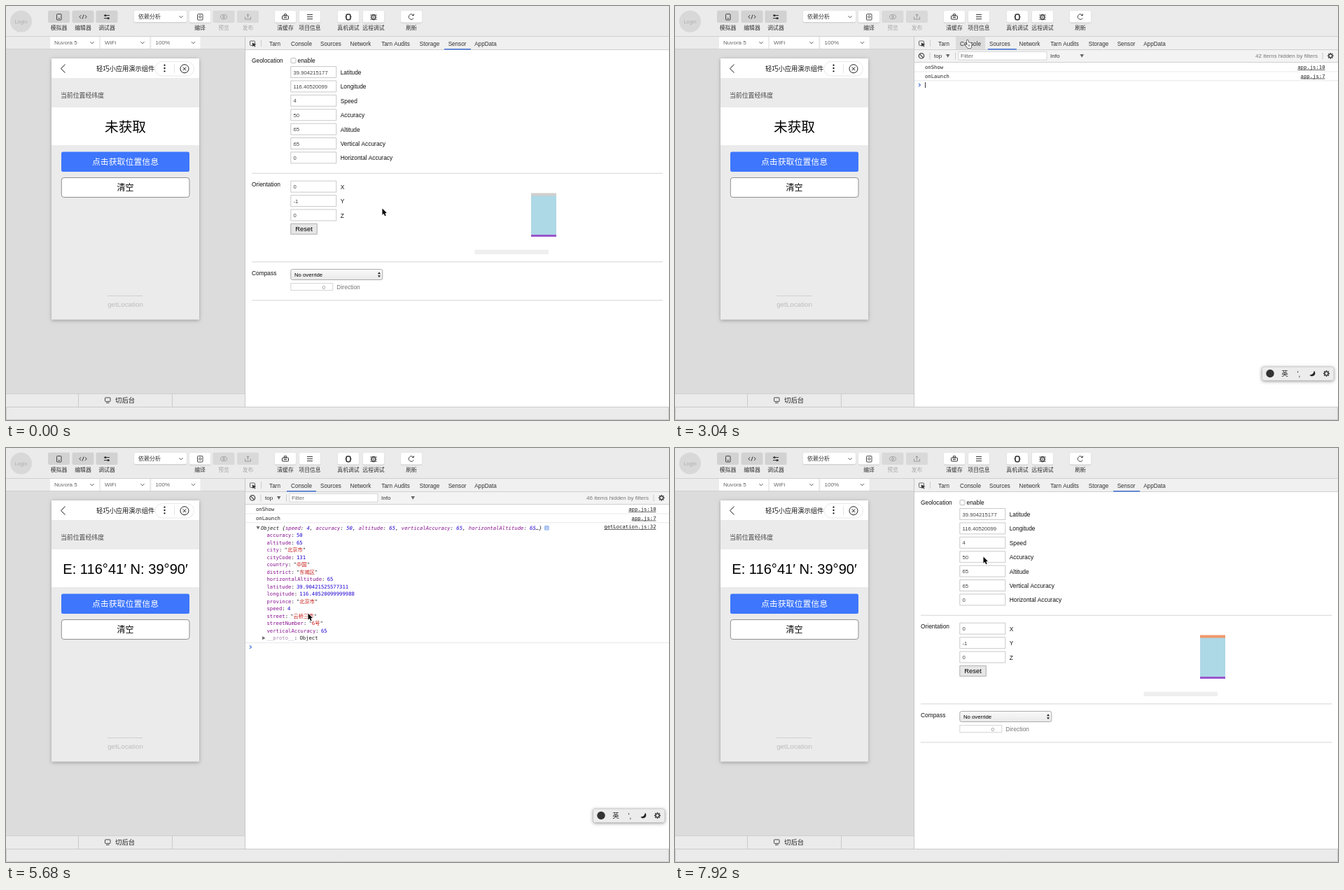
These frames come from a looping animation (947 px wide and 592 px high, 8 s). An HTML page with a canvas:

```html
<!DOCTYPE html>
<html lang="zh-CN">
<head>
<meta charset="utf-8">
<title>Sensor panel demo</title>
<style>
html, body { margin: 0; width: 100%; height: 100%; overflow: hidden; background: #fff; }
canvas { display: block; width: 947px; height: 592px; }
</style>
</head>
<body>
<canvas id="stage"></canvas>
<script>
const W = 947, H = 592, LOOP = 8000, STEP = 80;
const SANS = '"Liberation Sans", "Noto Sans CJK SC", "Noto Sans CJK", sans-serif';
const MONO = '"DejaVu Sans Mono", "Noto Sans CJK SC", "Noto Sans CJK", monospace';
const SHOW_CONSOLE = 2960, LOGGED = 3920, EXPANDED = 4960, SHOW_SENSOR = 7280;
const KEY = '#881391', NUM = '#1c00cf', STR = '#c41a16', INK = '#222';

const canvas = document.getElementById('stage');
const c = canvas.getContext('2d');
const dpr = window.devicePixelRatio || 1;
canvas.width = W * dpr;
canvas.height = H * dpr;

// ---- drawing helpers ----
function rect(x, y, w, h, color) {
  c.fillStyle = color;
  c.fillRect(x, y, w, h);
}
function box(x, y, w, h, r, fill, stroke, lw = 1) {
  c.beginPath();
  c.roundRect(x, y, w, h, r);
  if (fill) { c.fillStyle = fill; c.fill(); }
  if (stroke) { c.strokeStyle = stroke; c.lineWidth = lw; c.stroke(); }
}
function shadowBox(x, y, w, h, r, fill, blur, alpha) {
  c.save();
  c.shadowColor = `rgba(0,0,0,${alpha})`;
  c.shadowBlur = blur * dpr;
  c.shadowOffsetY = dpr;
  box(x, y, w, h, r, fill);
  c.restore();
}
function line(points, color, lw = 1) {
  c.beginPath();
  points.forEach(([x, y], i) => i ? c.lineTo(x, y) : c.moveTo(x, y));
  c.strokeStyle = color;
  c.lineWidth = lw;
  c.stroke();
}
function poly(points, fill) {
  c.beginPath();
  points.forEach(([x, y]) => c.lineTo(x, y));
  c.closePath();
  c.fillStyle = fill;
  c.fill();
}
function ring(x, y, r, color, lw = 1) {
  c.beginPath();
  c.arc(x, y, r, 0, 7);
  c.strokeStyle = color;
  c.lineWidth = lw;
  c.stroke();
}
function dot(x, y, r, color) {
  c.beginPath();
  c.arc(x, y, r, 0, 7);
  c.fillStyle = color;
  c.fill();
}
// y is the middle of the capitals
function text(s, x, y, size, color = '#111', align = 'left', font = SANS, style = '') {
  c.font = `${style} ${size}px ${font}`;
  c.textAlign = align;
  c.fillStyle = color;
  c.fillText(s, x, y + size * 0.37);
  return c.measureText(s).width;
}
const code = (s, x, y, color = INK, style = '', align = 'left') => text(s, x, y, 7.26, color, align, MONO, style);

function chevron(x, y) {
  line([[x - 2.5, y - 1.3], [x, y + 1.3], [x + 2.5, y - 1.3]], '#555', 1);
}
function gear(x, y, r, color) {
  for (let i = 0; i < 8; i++) {
    const a = i * Math.PI / 4, u = Math.cos(a), v = Math.sin(a);
    line([[x + u * r * 0.7, y + v * r * 0.7], [x + u * r * 1.1, y + v * r * 1.1]], color, 1.5);
  }
  ring(x, y, r * 0.62, color, 1.4);
}

// ---- toolbar ----
const icons = {
  phone(x, y, k) { box(x - 3, y - 4, 6.5, 8.5, 1, null, k, 0.9); line([[x - 1, y + 2.3], [x + 1.5, y + 2.3]], k, 0.9); },
  code(x, y, k) {
    line([[x - 3, y - 2.3], [x - 5, y], [x - 3, y + 2.3]], k);
    line([[x + 3, y - 2.3], [x + 5, y], [x + 3, y + 2.3]], k);
    line([[x + 1, y - 3], [x - 1, y + 3]], k);
  },
  sliders(x, y, k) {
    line([[x - 4, y - 2], [x + 4, y - 2]], k); line([[x - 4, y + 2], [x + 4, y + 2]], k);
    dot(x - 2, y - 2, 1.6, k); dot(x + 2, y + 2, 1.6, k);
  },
  build(x, y, k) { box(x - 3.5, y - 4, 7.5, 8.5, 1, null, k, 0.9); ring(x + 0.3, y, 1.6, k, 0.9); },
  eye(x, y, k) {
    c.beginPath(); c.ellipse(x, y, 4.6, 3, 0, 0, 7); c.strokeStyle = k; c.lineWidth = 0.9; c.stroke();
    ring(x, y, 1.3, k);
  },
  upload(x, y, k) {
    line([[x - 4, y], [x - 4, y + 3.5], [x + 4, y + 3.5], [x + 4, y]], k);
    line([[x, y + 1.5], [x, y - 4]], k); line([[x - 2, y - 2], [x, y - 4], [x + 2, y - 2]], k);
  },
  clear(x, y, k) { box(x - 4.5, y - 1.5, 9, 5, 0.8, null, k); box(x - 1.7, y - 4, 3.4, 2.5, 0.5, null, k); line([[x - 2, y + 1], [x + 2, y + 1]], k); },
  list(x, y, k) { for (const d of [-3, 0, 3]) line([[x - 4, y + d], [x + 4, y + d]], k); },
  device(x, y, k) { box(x - 3, y - 3.8, 6, 8, 2.5, null, k, 1.6); line([[x - 4.5, y], [x - 3, y]], k); line([[x + 3, y], [x + 4.5, y]], k); },
  bug(x, y, k) {
    c.beginPath(); c.ellipse(x, y + 0.5, 2.6, 3.6, 0, 0, 7); c.strokeStyle = k; c.lineWidth = 1.3; c.stroke();
    for (const d of [-2.5, 0.5, 3.5]) { line([[x - 4.8, y + d], [x - 2, y + d]], k, 0.9); line([[x + 2, y + d], [x + 4.8, y + d]], k, 0.9); }
    line([[x, y - 3], [x, y + 4]], k, 0.9);
  },
  refresh(x, y, k) {
    c.beginPath(); c.arc(x, y, 3.8, 0.5, 5.6); c.strokeStyle = k; c.lineWidth = 0.9; c.stroke();
    line([[x + 3.6, y - 4.2], [x + 3.3, y - 2], [x + 1, y - 2]], k, 0.9);
  }
};
const PRESSED = '#d2d2d2', DIM = '#d9d9d9';
const tools = [
  ['phone', '模拟器', 75.5, PRESSED], ['code', '编辑器', 110, PRESSED], ['sliders', '调试器', 144, PRESSED],
  ['build', '编译', 277, '#fff'], ['eye', '预览', 311, DIM], ['upload', '发布', 345.5, DIM],
  ['clear', '清缓存', 399, '#fff'], ['list', '项目信息', 434, '#fff'],
  ['device', '真机调试', 489, '#fff'], ['bug', '远程调试', 525, '#fff'], ['refresh', '刷新', 579, '#fff']
];
function toolbar() {
  rect(0, 0, W, 43, '#ebebeb');
  rect(0, 43, W, 1, '#cfcfcf');
  dot(21.5, 22, 15.5, '#d8d8d8');
  text('Login', 21.5, 22, 7.4, '#b0b0b0', 'center');
  for (const [icon, label, x, bg] of tools) {
    const off = bg === DIM;
    if (bg === '#fff') shadowBox(x - 15, 7, 30, 16.5, 2, bg, 1.5, 0.15);
    else box(x - 15.5, 6.5, 31, 17.5, 2, bg);
    icons[icon](x, 15.5, off ? '#999' : '#333');
    text(label, x, 31.5, 7.85, off ? '#aaa' : '#333', 'center');
  }
  shadowBox(183, 7, 75, 16, 2, '#fff', 1.5, 0.15);
  text('依赖分析', 189, 15, 8, '#333');
  chevron(250, 15.5);
}

// ---- simulator ----
function simulator(located) {
  rect(0, 44, 341, 529, '#dcdcdc');
  rect(0, 44, 341, 18, '#ebebeb');
  rect(0, 61, 341, 1, '#d2d2d2');
  [['Nuvora 5', 63, 70], ['WiFi', 135, 70], ['100%', 207.5, 70]].forEach(([s, x, w]) => {
    rect(x, 44, w, 17, '#fff');
    text(s, x + 6, 52.5, 8.1, '#666');
    chevron(x + w - 10, 52.5);
  });
  shadowBox(65, 75, 211, 373.5, 0, '#ebebeb', 5, 0.28);
  rect(65, 75, 211, 28, '#fff');
  rect(65, 145, 211, 54, '#fff');
  line([[84.5, 83.5], [78.5, 89.5], [84.5, 95.5]], '#222', 1);
  text('轻巧小应用演示组件', 129, 89.5, 9.25, '#111');
  box(213, 79.5, 55.5, 20.5, 10.2, '#fff', '#e3e3e3', 0.8);
  for (const d of [-4.3, 0, 4.3]) dot(226.5, 89 + d, 1.15, '#111');
  rect(240, 83, 0.8, 13, '#ddd');
  ring(255, 89.7, 6, '#222', 1);
  line([[252.7, 87.4], [257.3, 92]], '#222');
  line([[257.3, 87.4], [252.7, 92]], '#222');
  text('当前位置经纬度', 78, 128, 8.9, '#444');
  if (located) text('E: 116°41′ N: 39°90′', 170.5, 173, 20.1, '#000', 'center');
  else text('未获取', 170.5, 173, 19.7, '#000', 'center');
  box(79, 208.5, 183, 28.5, 2.5, '#3e76fd');
  text('点击获取位置信息', 170.5, 223, 11.9, '#fff', 'center');
  box(79.3, 245.5, 182.7, 28, 3.5, '#fff', '#777', 0.8);
  text('清空', 170.5, 260, 12, '#000', 'center');
  rect(145, 414, 50, 1, '#cfcfcf');
  text('getLocation', 170.5, 426, 9.8, '#bdbdbd', 'center');

  rect(0, 554, 341, 19, '#ebebeb');
  rect(0, 554, 341, 1, '#cfcfcf');
  rect(103, 554, 1, 19, '#cacaca');
  rect(237, 554, 1, 19, '#cacaca');
  box(141.5, 560, 7.5, 5.5, 0.8, null, '#333', 0.9);
  line([[143, 567.5], [147.5, 567.5]], '#333', 0.9);
  text('切后台', 156, 564, 9.4, '#222');
}

// ---- devtools ----
const tabs = [
  ['Tarn', 384, 367, 401], ['Console', 422, 401, 443], ['Sources', 464, 443, 485],
  ['Network', 506.5, 485, 528], ['Tarn Audits', 556.5, 528, 585], ['Storage', 605, 585, 626],
  ['Sensor', 644.5, 626, 664], ['AppData', 685, 664, 707]
];
const slide = (t, at) => 1 - Math.pow(1 - Math.min(1, Math.max(0, (t - at) / 160)), 2.3);

function tabBar(t, [mx, my]) {
  rect(341, 44, W - 341, 18, '#f0f0f0');
  rect(341, 62, W - 341, 1, '#d0d0d0');
  box(348.5, 50, 7, 6.5, 1, null, '#555', 0.9);
  poly([[351.5, 52.5], [357.5, 55], [355, 55.8], [356.5, 58], [355.3, 58.5], [354, 56.5], [352.5, 58.3]], '#333');
  rect(364, 48, 1, 10, '#ccc');
  for (const [name, x, left, right] of tabs) {
    if (my > 44 && my < 60 && mx > left && mx < right) rect(left, 44, right - left, 18, '#dcdcdc');
    text(name, x, 53.5, 8.15, '#333', 'center');
  }
  const k = slide(t, SHOW_CONSOLE) - slide(t, SHOW_SENSOR);
  rect(626 - 225 * k, 61, 38 + 4 * k, 1.6, '#4a78d6');
}

function field(value, y) {
  box(406.8, y - 8, 65, 16, 0, '#fff', '#bbb', 0.8);
  text(value, 410.5, y + 0.3, 7.7, '#444');
}
function sensorPanel(fresh) {
  text('Geolocation', 351, 77.5, 8.4);
  box(407, 74.5, 7, 7, 1.3, '#fff', '#aaa', 0.8);
  text('enable', 416.5, 77.5, 8.4);
  [['39.904215177', 'Latitude'], ['116.40520099', 'Longitude'], ['4', 'Speed'], ['50', 'Accuracy'],
   ['65', 'Altitude'], ['65', 'Vertical Accuracy'], ['0', 'Horizontal Accuracy']].forEach(([v, name], i) => {
    const y = 94.5 + i * 20.4;
    field(v, y);
    text(name, 477.7, y + 0.3, 8.4);
  });
  for (const y of [238.7, 365.3, 420.3]) rect(351, y, 587, 1.2, '#dcdcdc');

  text('Orientation', 351, 255, 8.4);
  [['0', 'X'], ['-1', 'Y'], ['0', 'Z']].forEach(([v, name], i) => {
    field(v, 258.2 + i * 20.4);
    text(name, 477.7, 258.7 + i * 20.4, 8.4);
  });
  box(406.8, 311.3, 37.5, 15, 0, '#e6e6e6', '#aaa', 0.9);
  text('Reset', 425.5, 319, 9.4, '#000', 'center');
  rect(750, 268, 36, 62, '#add8e6');
  rect(750, 267.5, 36, 4, fresh ? '#f0996b' : '#d0cfcd');
  rect(750, 327, 36, 3, '#9a56ce');
  rect(669.5, 348.5, 105.5, 6.5, '#efefef');

  text('Compass', 351, 381.5, 8.4);
  const g = c.createLinearGradient(0, 376, 0, 392);
  g.addColorStop(0, '#fafafa');
  g.addColorStop(1, '#e9e9e9');
  box(406.8, 376.5, 131, 15, 2.5, g, '#999', 0.8);
  text('No override', 412, 384.3, 7.75, '#000');
  poly([[531, 383.2], [533, 380.3], [535, 383.2]], '#222');
  poly([[531, 385.2], [533, 388.1], [535, 385.2]], '#222');
  box(406.8, 396.5, 60, 10, 0, '#fff', '#ccc', 0.8);
  text('0', 456, 402, 7.7, '#888', 'right');
  text('Direction', 472.3, 401.7, 8.5, '#777');
}

const summary = [['speed', 4], ['accuracy', 50], ['altitude', 65], ['verticalAccuracy', 65], ['horizontalAltitude', 65]];
const props = [
  ['accuracy', '50'], ['altitude', '65'], ['city', '"北京市"'], ['cityCode', '131'], ['country', '"中国"'],
  ['district', '"东城区"'], ['horizontalAltitude', '65'], ['latitude', '39.90421525577311'],
  ['longitude', '116.40520099999988'], ['province', '"北京市"'], ['speed', '4'], ['street', '"云桥三弄"'],
  ['streetNumber', '"6号"'], ['verticalAccuracy', '65']
];
function link(s, y) {
  const w = code(s, 928.5, y, INK, '', 'right');
  rect(928.5 - w, y + 3.6, w, 0.7, INK);
}
function triangle(x, y, open) {
  poly(open ? [[x - 2.5, y - 2], [x + 2.5, y - 2], [x, y + 2.5]]
            : [[x - 2, y - 2.5], [x + 2.5, y], [x - 2, y + 2.5]], '#6e6e6e');
}
function logEntry(open) {
  triangle(360, 114, open);
  let x = 364;
  const put = (s, color) => { x += code(s, x, 114, color, 'italic'); };
  put('Object {', INK);
  summary.forEach(([key, value], i) => {
    put(key, KEY);
    put(': ', INK);
    put(String(value), NUM);
    put(i < 4 ? ', ' : '…}', INK);
  });
  link('getLocation.js:32', 112.7);
  if (!open) return;
  box(768.8, 110.8, 7, 7, 1.5, '#a9c3f0');
  text('i', 772.3, 114.4, 6, '#fff', 'center');
  props.forEach(([key, value], i) => {
    const y = 124.7 + i * 10.5;
    let px = 372.5;
    px += code(key, px, y, KEY);
    px += code(':', px, y) + 3.2;
    if (value[0] !== '"') return code(value, px, y, NUM);
    px += code('"', px, y);
    px += code(value.slice(1, -1), px, y, STR);
    code('"', px, y);
  });
  triangle(368, 271.7, false);
  code('__proto__', 372.5, 271.7, '#a98ab0');
  code(':', 411.8, 271.7);
  code('Object', 419.4, 271.7);
}
function consolePanel(t) {
  const logged = t >= LOGGED, open = t >= EXPANDED;
  rect(342, 63, W - 342, 17, '#f3f3f3');
  rect(342, 80, W - 342, 1, '#d0d0d0');
  ring(352, 71.3, 3.7, '#444', 1.2);
  line([[349.5, 68.8], [354.5, 73.8]], '#444', 1.2);
  for (const x of [363.5, 400, 924.5]) rect(x, 66.5, 1, 10, '#ccc');
  text('top', 370, 71.3, 8.1, '#333');
  poly([[387, 69], [392.4, 69], [389.7, 73.8]], '#666');
  box(405, 65.3, 126, 11.8, 0, '#fff', '#ccc', 0.8);
  text('Filter', 408, 71.3, 8.1, '#666');
  text('Info', 536, 71.3, 8.1, '#333');
  poly([[578.5, 69], [584, 69], [581.2, 73.8]], '#666');
  text(`${logged ? 46 : 42} items hidden by filters`, 918, 71.3, 8.05, '#777', 'right');
  gear(936.3, 71.3, 4, '#444');

  code('onShow', 357, 87.5);
  link('app.js:10', 87.3);
  code('onLaunch', 357, 100.2);
  link('app.js:7', 100);
  const rules = [93.5, 106.3];
  if (logged) {
    logEntry(open);
    rules.push(open ? 278 : 120.3);
  }
  for (const y of rules) rect(342, y, W - 342, 0.9, '#e6e6e6');

  const y = !logged ? 113 : open ? 284.7 : 127;
  line([[348, y - 2.2], [350.5, y], [348, y + 2.2]], '#3f6fe0', 1.1);
  const since = open ? t - EXPANDED : t - SHOW_CONSOLE;
  if ((open || !logged) && since % 1000 < 500) rect(357, y - 4, 0.9, 8, '#222');
}

function imeBar() {
  shadowBox(838.5, 516, 102.5, 19.5, 3, '#ececec', 5, 0.45);
  box(838.5, 516, 102.5, 19.5, 3, null, '#c4c4c4', 0.7);
  dot(850, 525.5, 5.7, '#333');
  text('英', 871, 525.5, 9.5, '#222', 'center');
  text("',", 891, 526, 10, '#222', 'center');
  c.beginPath();
  c.arc(910, 525, 4.4, -0.9, 2.5);
  c.quadraticCurveTo(912.3, 527.5, 912.8, 521.6);
  c.fillStyle = '#222';
  c.fill();
  gear(930.5, 525.5, 4.2, '#333');
}

// ---- pointer ----
const path = [
  [0, 537.5, 289.5], [320, 552, 200], [480, 552, 200], [800, 508, 51], [960, 508, 51], [1040, 466, 51],
  [1200, 466, 51], [1440, 638, 52], [1600, 638, 52], [1920, 184, 232], [2080, 184, 232], [2160, 181.5, 229.5],
  [2400, 181.5, 229.5], [2880, 420, 49], [3040, 418, 48.5], [3200, 418, 48.5], [3760, 190, 224], [4080, 190, 224],
  [4400, 364.5, 217.5], [4800, 360, 115], [5120, 360, 115], [5680, 431.5, 236.5], [6080, 450, 250],
  [6320, 470, 230], [6800, 645, 61], [7120, 645, 52], [7360, 645, 52], [7760, 440.5, 155.5], [8000, 440.5, 155.5]
];
function pointerAt(t) {
  const i = path.findIndex(p => p[0] > t);
  const [t0, x0, y0] = path[i - 1], [t1, x1, y1] = path[i];
  const p = (t - t0) / (t1 - t0), k = p * p * (3 - 2 * p);
  return [x0 + (x1 - x0) * k, y0 + (y1 - y0) * k];
}
function pointer([x, y]) {
  const hand = x > 367 && x < 707 && y > 44 && y < 62.5;
  const arrow = [[0, 0], [0, 9.2], [2.1, 7.3], [3.6, 10.7], [5.2, 10], [3.7, 6.7], [6.4, 6.5]];
  const fist = [[-0.9, 0.2], [0.7, 0.2], [1.1, 3.6], [5.2, 4.6], [5.8, 6], [4.8, 11.4], [0, 11.4], [-3.6, 7.2], [-2.9, 6.2], [-0.7, 7.4]];
  c.beginPath();
  (hand ? fist : arrow).forEach(([dx, dy]) => c.lineTo(x + dx, y + dy));
  c.closePath();
  c.lineJoin = 'round';
  c.lineWidth = hand ? 1.1 : 1.5;
  c.strokeStyle = hand ? '#111' : '#fff';
  c.stroke();
  c.fillStyle = hand ? '#fff' : '#000';
  c.fill();
  if (hand) for (const d of [1.2, 2.8]) line([[x + d, y + 6.5], [x + d, y + 9.5]], '#333', 0.6);
  c.lineJoin = 'miter';
}

function draw(t) {
  const mouse = pointerAt(t);
  const inConsole = t >= SHOW_CONSOLE && t < SHOW_SENSOR;
  c.setTransform(dpr, 0, 0, dpr, 0, 0);
  rect(0, 0, W, H, '#fff');
  toolbar();
  simulator(t >= LOGGED);
  tabBar(t, mouse);
  if (inConsole) consolePanel(t);
  else sensorPanel(t >= SHOW_SENSOR);
  rect(341, 44, 1, 529, '#c8c8c8');
  rect(0, 573, W, 19, '#ebebeb');
  box(0.5, 573.5, W - 1, 18, 0, null, '#cacaca');
  if (inConsole && (t < LOGGED || t >= EXPANDED)) imeBar();
  pointer(mouse);
}

const start = performance.now();
function tick() {
  const t = (performance.now() - start) % LOOP;
  draw(Math.floor(t / STEP) * STEP);
  requestAnimationFrame(tick);
}
tick();
</script>
</body>
</html>
```
